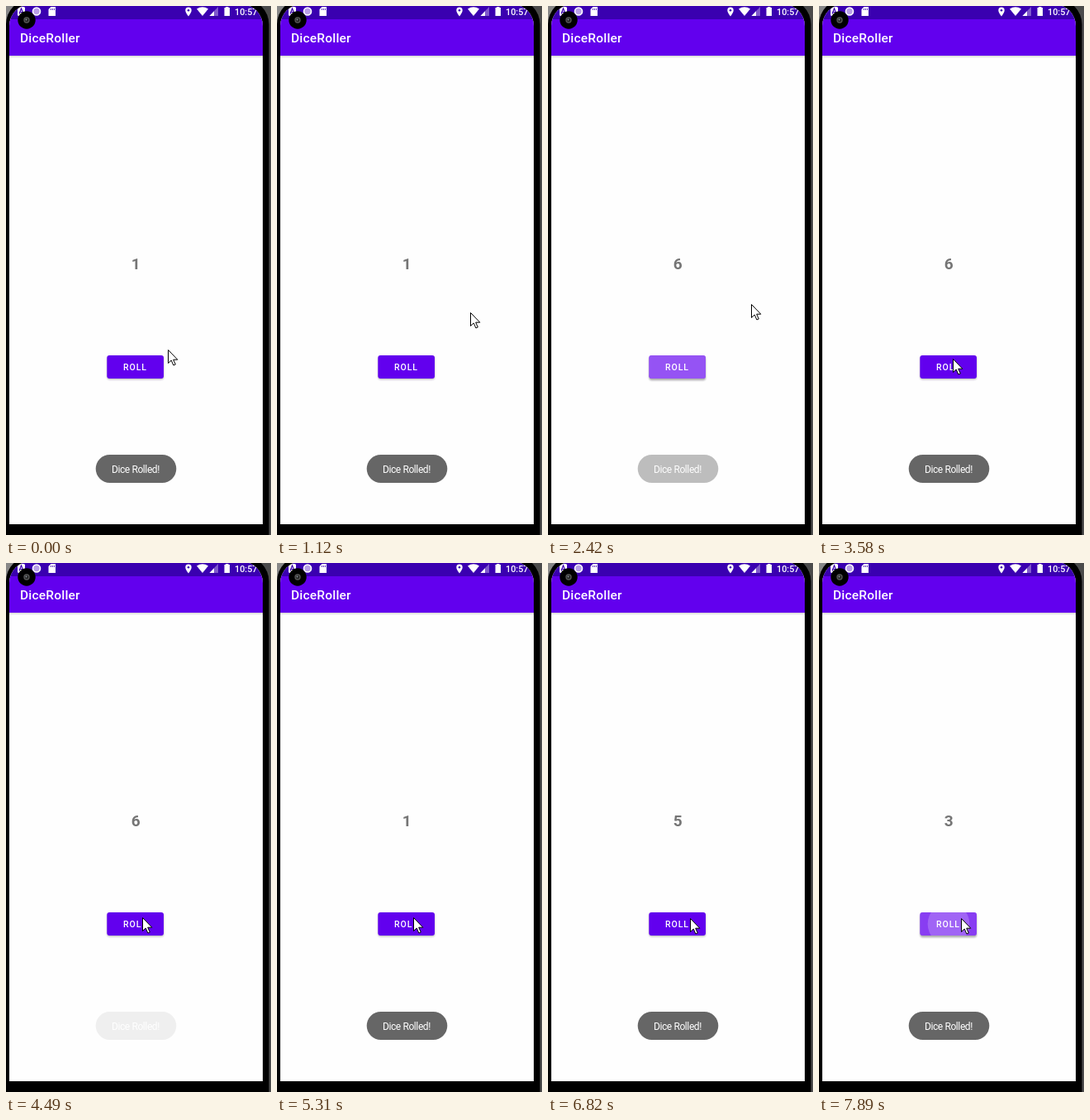
Write an HTML page that moves like this. It is 321 px wide and 639 px high and loops after 8000 ms.

```html
<!DOCTYPE html>
<html lang="en">
<head>
<meta charset="utf-8">
<title>DiceRoller</title>
<style>
  html, body { margin: 0; width: 100%; height: 100%; overflow: hidden; background: #000; }
  svg { display: block; width: 321px; height: 639px; font-family: Roboto, "Open Sans", sans-serif; }
</style>
</head>
<body>
<svg viewBox="0 0 321 639">
  <defs>
    <clipPath id="screen"><path d="M4 626V24A26 26 0 0 1 30 -2H285A26 26 0 0 1 311 24V626Z"/></clipPath>
    <clipPath id="buttonClip"><rect x="122.300" y="422" width="68.700" height="28" rx="3"/></clipPath>
    <linearGradient id="barShadow" x2="0" y2="1">
      <stop stop-color="#000" stop-opacity=".17"/><stop offset="1" stop-color="#000" stop-opacity="0"/>
    </linearGradient>
    <linearGradient id="desk"><stop stop-color="#888"/><stop offset="1" stop-color="#4a4a4a"/></linearGradient>
    <filter id="blur" x="-20%" y="-40%" width="140%" height="180%"><feGaussianBlur stdDeviation="1.2"/></filter>
  </defs>

  <!-- phone body -->
  <rect width="321" height="639" fill="url(#desk)"/>
  <path d="M0 639V22A30 30 0 0 1 30 -8H288.500A30 30 0 0 1 318.500 22V639Z"/>

  <g clip-path="url(#screen)">
    <rect width="321" height="639" fill="#fefefe"/>
    <rect y="60" width="321" height="3" fill="url(#barShadow)"/>
    <rect y="16" width="321" height="44" fill="#6200ee"/>
    <rect width="321" height="16" fill="#3a00b0"/>

    <!-- status icons -->
    <g fill="#fff">
      <rect x="14" y="1" width="9" height="11" rx="1.500"/>
      <path d="M16 9.500L18.500 3L21 9.500M17 7.500H20" fill="none" stroke="#3a00b0" stroke-width="1.200"/>
      <circle cx="37" cy="6.500" r="4.500" fill="#b9a0e8" stroke="#fff" stroke-width="1.600"/>
      <path d="M54.500 1H60V12H51.500V4Z"/>
      <path d="M54.500 3V5M56.500 3V5M58.500 3V5" stroke="#3a00b0" stroke-width=".8"/>
      <path d="M221 12.500C218.500 9 217.300 7 217.300 5.200A3.700 3.700 0 0 1 224.700 5.200C224.700 7 223.500 9 221 12.500Z"/>
      <circle cx="221" cy="5.200" r="1.300" fill="#3a00b0"/>
      <path d="M231 3.500Q238 -1 245 3.500L238 12Z"/>
      <path d="M257 1V12H246.500Z" opacity=".35"/>
      <path d="M252 6.200V12H246.500Z"/>
      <path d="M266 2V1H269.500V2H271V12H264.500V2Z"/>
      <text x="277" y="11" font-size="10.800" font-weight="500">10:57</text>
      <text x="17" y="44" font-size="15.500" font-weight="500" letter-spacing=".2">DiceRoller</text>
    </g>

    <text id="number" x="157.300" y="318.300" text-anchor="middle" font-size="19" font-weight="700" fill="#757575"></text>

    <!-- button -->
    <rect id="shadow" x="122.500" width="68.500" height="28" rx="3" filter="url(#blur)"/>
    <g clip-path="url(#buttonClip)">
      <rect x="122" y="421" width="70" height="30" fill="#6200ee"/>
      <rect id="glow" x="122" y="421" width="70" height="30" fill="#fff"/>
      <circle id="ripple" fill="#fff"/>
    </g>
    <text x="142" y="440" font-size="10.500" font-weight="500" letter-spacing=".95" fill="#fff">ROLL</text>

    <g id="toast">
      <rect x="108.700" y="542" width="97.600" height="34" rx="17" fill="#666"/>
      <text x="128" y="563.500" font-size="12" letter-spacing="-.4" fill="#fff">Dice Rolled!</text>
    </g>
  </g>

  <!-- camera -->
  <circle cx="25" cy="17" r="10.700"/>
  <circle cx="25" cy="17" r="3" fill="#222" stroke="#555" stroke-width="1.400"/>
  <circle cx="24.500" cy="16.500" r="1" fill="#8b949c"/>

  <path id="cursor" d="M.5 .5V16.500L4.200 13L6.900 19L9.300 18L6.700 12.200H11.800Z" fill="#fff" stroke="#000"/>
</svg>
<script>
const LOOP = 8000;
const TICK = 136.4;  // the screen refreshes once per tick
const $ = id => document.getElementById(id);

// Each press of the button rolls a face and shows the toast.
const rolls = [[-750, 1], [2000, 6], [4600, 1], [5710, 5], [7110, 3], [7700, 3]]
  .map(([time, face]) => ({ time, face }));

// Places the cursor passes or rests at.
const stops = [
  [0, 196, 415], [420, 297, 297], [690, 259, 345], [970, 259, 345], [1400, 171, 434],
  [2160, 171, 434], [2420, 294, 313], [2990, 272, 333], [3290, 158, 423],
  [3730, 165, 428], [5740, 165, 428], [6280, 172, 429]
].map(([time, x, y]) => ({ time, x, y }));

const clamp = x => Math.min(1, Math.max(0, x));
const ramp = (t, from, length) => clamp((t - from) / length);
const mix = (a, b, p) => a + (b - a) * p;
const latest = (list, t) => list.filter(e => e.time <= t).pop();

function cursorAt(t) {
  const a = latest(stops, t) || stops[0];
  const b = stops.find(s => s.time > t) || a;
  const p = a === b ? 0 : ramp(t, a.time, b.time - a.time);
  return { x: mix(a.x, b.x, p), y: mix(a.y, b.y, p) };
}

const toastAlpha = age => ramp(age, 200, 280) * (1 - ramp(age, 2150, 390));

function set(id, attrs) {
  for (const name in attrs) $(id).setAttribute(name, attrs[name]);
}

function draw(t) {
  const { x, y } = cursorAt(t);
  set('cursor', { transform: `translate(${Math.round(x)} ${Math.round(y)})` });
  set('toast', { opacity: Math.max(...rolls.map(r => toastAlpha(t - r.time))) });
  $('number').textContent = latest(rolls, t - 140).face;

  const press = latest(rolls, t).time;
  const age = t - press;
  const lit = ramp(age, 0, 80) * (1 - ramp(age, 300, 265));
  const touch = cursorAt(press), drift = ramp(age, 0, 180);
  set('glow', { opacity: .24 * lit });
  set('ripple', {
    cx: mix(touch.x, 157, drift),
    cy: mix(touch.y, 436, drift),
    r: 36 * ramp(age, 0, 300),
    opacity: .2 * (1 - ramp(age, 250, 200))
  });
  set('shadow', { opacity: .28 + .05 * lit, y: 423.2 + lit });
}

const start = performance.now();
function frame() {
  const t = (performance.now() - start) % LOOP;
  draw(Math.floor(t / TICK + .23) * TICK);
  requestAnimationFrame(frame);
}
frame();
</script>
</body>
</html>
```
